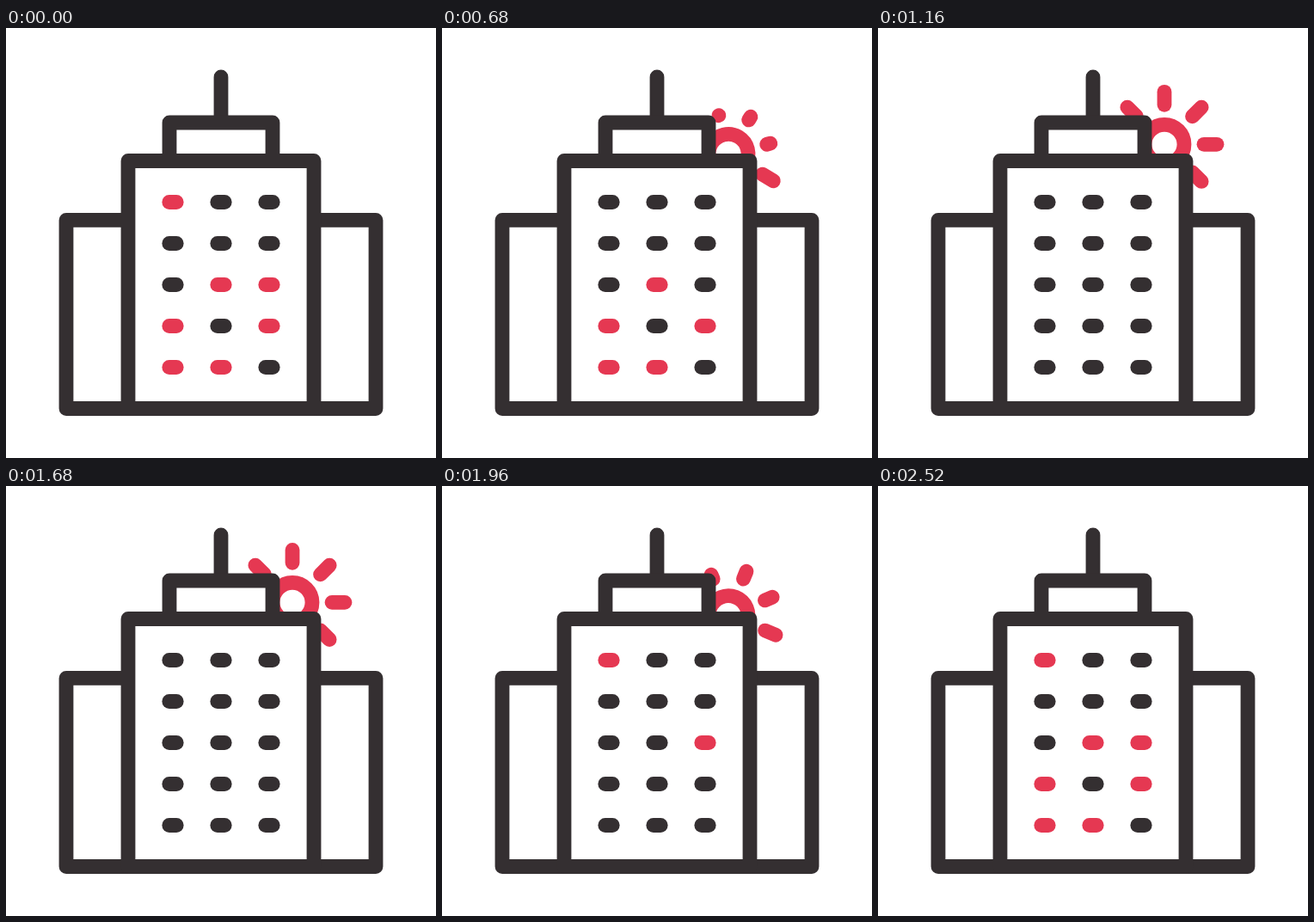
Write an HTML page that moves like this. It is 500 px wide and 500 px high and loops after 3000 ms.

```html
<!DOCTYPE html>
<html lang="en">
<head>
<meta charset="utf-8">
<title>Office tower, night and day</title>
<style>
  html, body { margin: 0; width: 100%; height: 100%; overflow: hidden; background: #fff; }
  svg { display: block; width: 100%; height: 100%; }
  g { stroke-width: 16.8; stroke-linecap: round; stroke-linejoin: round; }
  #sun { stroke: #e53852; fill: none; }
  #building { stroke: #342f31; fill: #fff; }
</style>
</head>
<body>
<svg viewBox="0 0 500 500">
  <g id="sun"><circle r="23"/></g>
  <g id="building">
    <path d="M250 57V110"/>
    <path d="M70 223.4H430V442.5H70Z"/>
    <path d="M190 154V110H310V154"/>
    <path d="M142 154.5H358V442.5H142Z"/>
  </g>
  <g id="windows"></g>
</svg>
<script>
const LOOP = 3000, FRAME = 40;
const DARK = '#342f31', RED = '#e53852';
const sun = document.getElementById('sun');

// row, column, time the light goes off, time it comes back on
const LIGHTS = [
  [0, 0, 480, 1760],
  [2, 2, 600, 1960],
  [2, 1, 720, 2520],
  [3, 0, 800, 2280],
  [4, 1, 920, 2160],
  [4, 0, 1000, 2320],
  [3, 2, 1160, 2120]
];

// angle, time at full width when growing, time shrinking to nothing
const RAYS = [
  [-135, 680, 2095],
  [-90, 640, 2135],
  [-45, 640, 2135],
  [0, 540, 2175],
  [45, 540, 2175]
];

const clamp = x => Math.min(1, Math.max(0, x));

function addLine(parent, x1, y1, x2, y2) {
  const line = document.createElementNS('http://www.w3.org/2000/svg', 'line');
  Object.entries({ x1, y1, x2, y2 }).forEach(([k, v]) => line.setAttribute(k, v));
  return parent.appendChild(line);
}

const panes = Array.from({ length: 15 }, (_, i) => {
  const x = 194 + 56 * (i % 3), y = 202.5 + 48 * Math.floor(i / 3);
  return addLine(document.getElementById('windows'), x - 4.2, y, x + 4.2, y);
});

const rays = RAYS.map(([angle]) => {
  const ray = addLine(sun, 46, 0, 61, 0);
  ray.setAttribute('transform', `rotate(${angle})`);
  return ray;
});

function sunPose(t) {
  if (t < 1400) {
    const left = clamp((1160 - t) / 680) ** 4;
    return { drop: 44.5 * left, turn: 125 * left };
  }
  const e = Math.max(0, t - 1660) / 180;
  return { drop: 5 * e ** 2.2, turn: 6.2 * e ** 2.5 };
}

function rayPose(t, grown, gone) {
  return t < 1400
    ? { width: clamp((t - grown + 80) / 80), reach: clamp((t - grown) / 140) }
    : { width: clamp((gone - t) / 80), reach: clamp((gone - 80 - t) / 150) };
}

function draw(t) {
  panes.forEach(pane => pane.setAttribute('stroke', DARK));
  for (const [row, col, off, on] of LIGHTS) {
    if (t < off || t >= on) panes[row * 3 + col].setAttribute('stroke', RED);
  }

  const { drop, turn } = sunPose(t);
  sun.style.display = t >= 480 && t <= 2160 ? '' : 'none';
  sun.setAttribute('transform', `translate(333 ${135.3 + drop}) rotate(${turn})`);
  rays.forEach((ray, i) => {
    const { width, reach } = rayPose(t, RAYS[i][1], RAYS[i][2]);
    ray.setAttribute('stroke-width', 16.8 * width);
    ray.setAttribute('x2', 46.01 + 15 * reach);
  });
}

const start = performance.now();
function tick() {
  const t = (performance.now() - start) % LOOP;
  draw(Math.floor(t / FRAME) * FRAME);
  requestAnimationFrame(tick);
}
tick();
</script>
</body>
</html>
```
